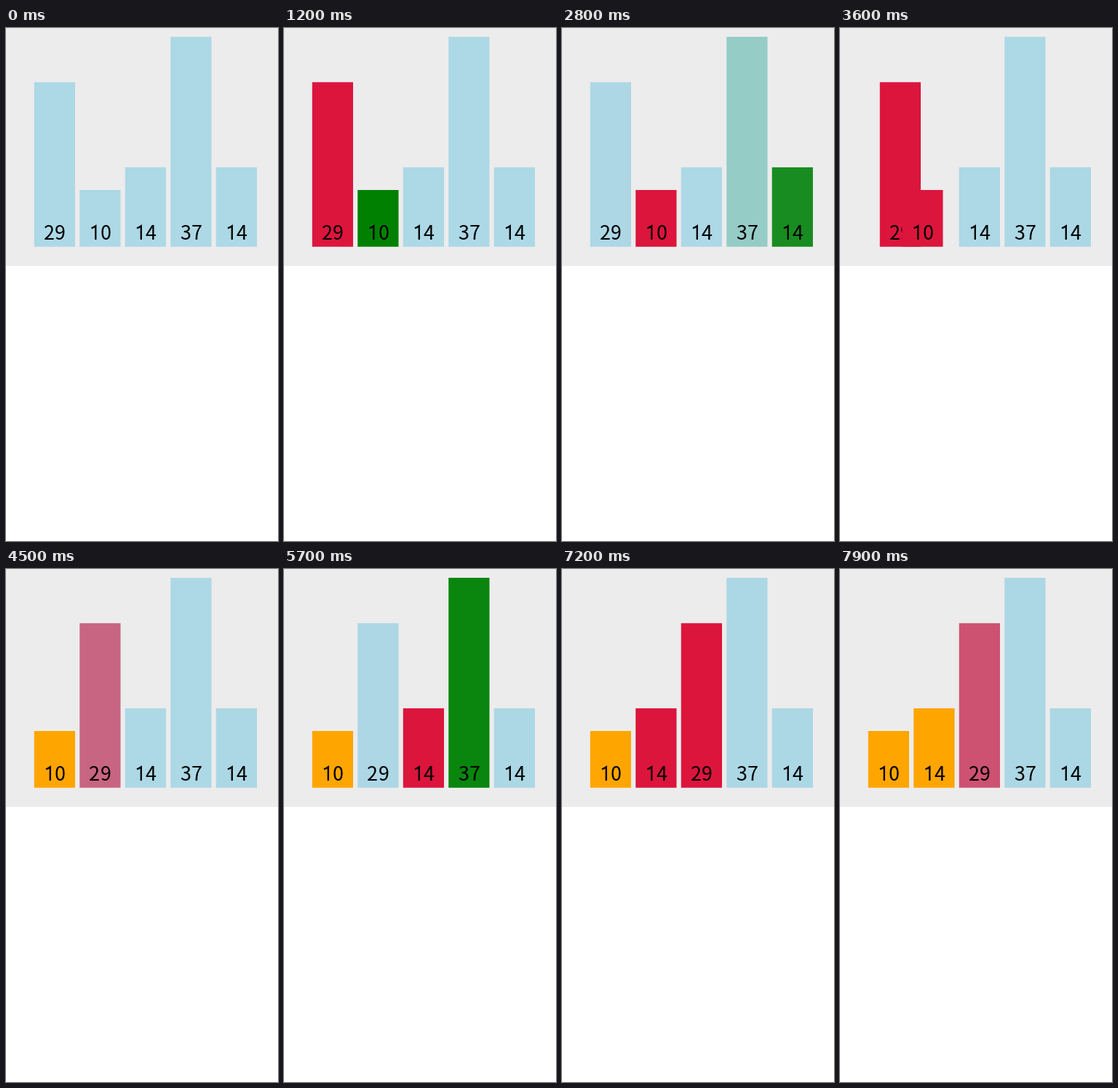
A matplotlib script that plays this animation: 374 px wide and 703 px high, repeating every 8000 ms.

```python
import numpy as np
import matplotlib.pyplot as plt
from matplotlib.animation import FuncAnimation
from matplotlib.colors import to_rgb
from matplotlib.lines import Line2D
from matplotlib.patches import Rectangle

WIDTH, HEIGHT, DPI = 374, 703, 100
PX = 72 / DPI
INTERVAL, FRAMES = 100, 80
STEP = 1 / 3  # share of a 300 ms transition covered by one frame

VALUES = [29, 10, 14, 37, 14]
LEFT, PITCH, BAR_W = 38.75, 62.5, 56.25
BASE, UNIT = 299.75, 7.775
DIGIT_W, TEXT_BASE = 15, 290

IDLE, MINIMUM, CHECK, SORTED = (
    np.array(to_rgb(c)) for c in ("lightblue", "crimson", "green", "orange"))

# (first frame, frames, progress on the first frame, {bar: new colour})
RECOLOURS = [
    (5, 2, 0.55, {0: MINIMUM}),
    (10, 3, 0.34, {1: CHECK}),
    (14, 2, 0.55, {0: IDLE, 1: MINIMUM}),
    (19, 2, 0.55, {2: CHECK}),
    (22, 3, 0.34, {2: IDLE, 3: CHECK}),
    (27, 3, 0.34, {3: IDLE, 4: CHECK}),
    (31, 2, 0.55, {4: IDLE, 0: MINIMUM}),
    (39, 3, 0.34, {1: SORTED, 0: IDLE}),
    (45, 2, 0.53, {0: MINIMUM}),
    (48, 2, 0.55, {2: CHECK}),
    (53, 2, 0.55, {0: IDLE, 2: MINIMUM}),
    (56, 2, 0.42, {3: CHECK}),
    (62, 2, 0.55, {3: IDLE, 4: CHECK}),
    (65, 2, 0.55, {4: IDLE, 0: MINIMUM}),
    (73, 3, 0.34, {2: SORTED, 0: IDLE}),
    (79, 2, 0.57, {0: MINIMUM}),
]
# (first frame, bar moving right, bar moving left, slots travelled)
SWAPS = [(36, 0, 1, 1), (70, 0, 2, 1)]


def cubic_in_out(t):
    t = min(max(t, 0), 1)
    return 4 * t ** 3 if t < 0.5 else 1 - 4 * (1 - t) ** 3


def progress(frame, start, count, phase):
    if frame < start:
        return 0
    return cubic_in_out(phase + STEP * min(frame - start, count - 1))


class Bar:
    def __init__(self, ax, index, value):
        top = BASE - value * UNIT
        self.rect = Rectangle((0, top), BAR_W, BASE - top, lw=0,
                              snap=False, zorder=2 * index + 2)
        ax.add_patch(self.rect)
        self.digits = []
        for k, char in enumerate(str(value)):
            offset = BAR_W / 2 + (k - 0.5) * DIGIT_W
            self.digits.append(self.add_digit(ax, char, 2 * index + 3) + (offset,))

    @staticmethod
    def add_digit(ax, char, z):
        """Return the artist and its x coordinates around the digit's centre."""
        if char == "1":  # plain stroke without a foot
            xs = np.array([-4.4, -1.6, 1.4, 1.4])
            ys = TEXT_BASE + np.array([-15.7, -16.8, -18.7, 0])
            line = Line2D(xs, ys, color="black", lw=2.3 * PX, zorder=z,
                          solid_capstyle="butt", solid_joinstyle="miter")
            ax.add_line(line)
            return line, xs
        text = ax.text(0, TEXT_BASE, char, fontsize=27 * PX, ha="center",
                       va="baseline", color="black", zorder=z,
                       family="Noto Sans CJK JP")
        return text, 0

    def place(self, slot, colour):
        x = LEFT + slot * PITCH
        self.rect.set_x(x)
        self.rect.set_facecolor(np.clip(colour, 0, 1))
        for artist, xs, offset in self.digits:
            if isinstance(artist, Line2D):
                artist.set_xdata(x + offset + xs)
            else:
                artist.set_x(x + offset)


fig = plt.figure(figsize=(WIDTH / DPI, HEIGHT / DPI), dpi=DPI, facecolor="white")
ax = fig.add_axes([0, 0, 1, 1])
ax.set_xlim(0, WIDTH)
ax.set_ylim(HEIGHT, 0)
ax.axis("off")
ax.add_patch(Rectangle((0, 0), WIDTH, 326, fc="#ececec", lw=0, zorder=0))
bars = [Bar(ax, i, value) for i, value in enumerate(VALUES)]


def update(frame):
    slots = list(range(len(VALUES)))
    colours = [IDLE] * len(VALUES)
    for start, count, phase, changes in RECOLOURS:
        p = progress(frame, start, count, phase)
        for i, colour in changes.items():
            colours[i] = colours[i] + (colour - colours[i]) * p
    for start, right, left, distance in SWAPS:
        p = progress(frame, start, 3, 0.4)
        slots[right] += distance * p
        slots[left] -= distance * p
    for bar, slot, colour in zip(bars, slots, colours):
        bar.place(slot, colour)
    return []


anim = FuncAnimation(fig, update, frames=FRAMES, interval=INTERVAL,
                     repeat=True, repeat_delay=0, init_func=lambda: update(0))
plt.show()
```
